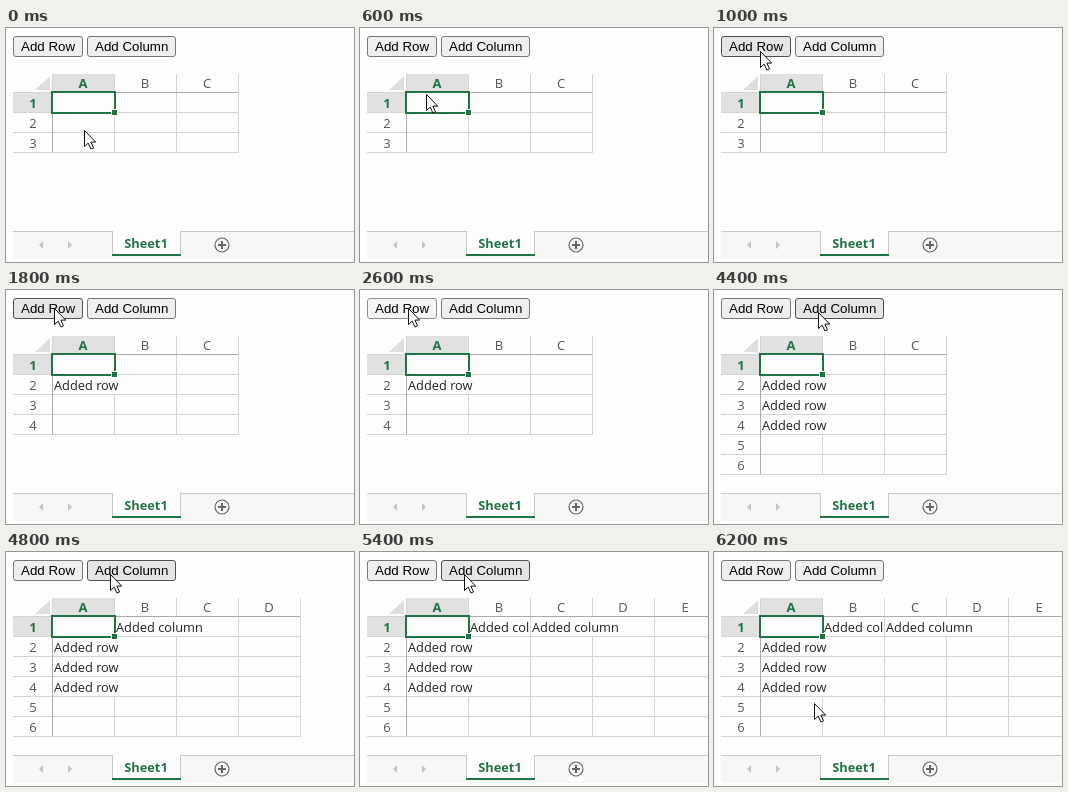
Write an HTML page with a canvas that moves like this. It is 348 by 234 pixels and loops after 6400 ms.

```html
<!DOCTYPE html>
<html lang="en">
<head>
<meta charset="utf-8">
<title>Spreadsheet: add rows and columns</title>
<style>
  html, body { margin: 0; width: 100%; height: 100%; overflow: hidden; background: #fefefe; }
  canvas { display: block; }
</style>
</head>
<body>
<canvas id="stage" width="348" height="234"></canvas>
<script>
const ctx = document.getElementById('stage').getContext('2d');
const LOOP = 6400, GREEN = '#217346', PAPER = '#fefefe', GRID = '#d4d4d4';
const LEFT = 46, TOP = 64, COL = 62, ROW = 20;
const CELL_FONT = '12.8px "Open Sans", "Noto Sans", sans-serif';
const HEAD_FONT = '13px "Open Sans", "Noto Sans", sans-serif';
const BUTTON_FONT = '13.333px "Liberation Sans", Arial, sans-serif';

// Pointer stops: time, x, y
const pointer = [
  [0, 78, 102], [400, 74, 88], [600, 66, 66], [800, 55, 42], [1000, 46, 23],
  [1200, 48, 18], [4000, 58, 19], [4200, 104, 22], [6200, 100, 151]
];
const rowTimes = [1800, 2800, 3600];
const colTimes = [4800, 5200];
const pressTimes = [1600, 2600, 3400, 4600];

const countPast = (times, t) => times.filter(s => t >= s).length;

function box(x, y, w, h, color) {
  ctx.fillStyle = color;
  ctx.fillRect(x, y, w, h);
}

function label(text, x, y, font, color, align = 'left') {
  ctx.font = font;
  ctx.fillStyle = color;
  ctx.textAlign = align;
  ctx.fillText(text, x, y);
}

function shape(points, fill, stroke) {
  ctx.beginPath();
  points.forEach(([x, y]) => ctx.lineTo(x, y));
  ctx.closePath();
  ctx.fillStyle = fill;
  ctx.fill();
  if (stroke) {
    ctx.strokeStyle = stroke;
    ctx.lineWidth = 1;
    ctx.stroke();
  }
}

function button(text, x, w, hover, pressed) {
  const [fill, edge] = pressed ? ['#f5f5f5', '#8d8d8d']
    : hover ? ['#e5e5e5', '#4f4f4f'] : ['#efefef', '#767676'];
  ctx.beginPath();
  ctx.roundRect(x + .5, 8.5, w - 1, 20, 2.5);
  ctx.fillStyle = fill;
  ctx.fill();
  ctx.strokeStyle = edge;
  ctx.lineWidth = 1;
  ctx.stroke();
  label(text, x + 8, 23, BUTTON_FONT, '#000');
}

function header(text, x, y, active) {
  label(text, x, y, (active ? 'bold ' : '') + HEAD_FONT, active ? GREEN : '#555', 'center');
}

// Cell text runs over empty neighbours and is cut at the given span.
function cell(text, col, row, span) {
  const x = LEFT + col * COL, y = TOP + row * ROW;
  ctx.save();
  ctx.beginPath();
  ctx.rect(x + 1, y + 1, span * COL - 1, ROW - 1);
  ctx.clip();
  if (span > 1) box(x + COL, y + 1, 1, ROW - 1, PAPER);
  label(text, x + 2, y + 16, CELL_FONT, '#222');
  ctx.restore();
}

function sheet(addedRows, addedCols) {
  const rows = 3 + addedRows, cols = 3 + addedCols;
  const width = cols * COL, height = rows * ROW;

  box(LEFT, 46, COL, 18, '#e1e1e1');
  box(7, TOP, 39, ROW, '#e1e1e1');
  shape([[44, 48], [44, 62], [29, 62]], '#dedede');

  for (let c = 0; c <= cols; c++) box(LEFT + c * COL, 46, 1, 19 + height, GRID);
  for (let r = 0; r <= rows; r++) box(7, TOP + r * ROW, 40 + width, 1, GRID);
  box(LEFT, TOP, 1, height, '#ababab');
  box(LEFT, TOP, width, 1, '#ababab');

  for (let c = 0; c < cols; c++) header('ABCDE'[c], LEFT + 31 + c * COL, 60, c === 0);
  for (let r = 0; r < rows; r++) header(r + 1, 27, 80 + r * ROW, r === 0);

  for (let r = 1; r <= addedRows; r++) cell('Added row', 0, r, 2);
  for (let c = 1; c <= addedCols; c++) cell('Added column', c, 0, c === addedCols ? 2 : 1);

  ctx.strokeStyle = GREEN;
  ctx.lineWidth = 2;
  ctx.strokeRect(LEFT, TOP, COL + 1, ROW + 1);
  box(105, 81, 7, 7, PAPER);
  box(106, 82, 5, 5, GREEN);
}

function tabs() {
  box(7, 203, 341, 28, '#f7f7f7');
  box(7, 203, 341, 1, '#c8c8c8');
  box(106, 203, 69, 25, '#c8c8c8');
  box(107, 203, 67, 24, PAPER);
  box(106, 226, 69, 2, GREEN);
  label('Sheet1', 140, 220, 'bold 12.8px "Open Sans", "Noto Sans", sans-serif', GREEN, 'center');
  shape([[37, 213], [37, 221], [33, 217]], '#c3c3c3');
  shape([[62, 213], [62, 221], [66, 217]], '#c3c3c3');
  ctx.beginPath();
  ctx.arc(216, 217, 7, 0, 2 * Math.PI);
  ctx.strokeStyle = '#666';
  ctx.lineWidth = 1.2;
  ctx.stroke();
  box(212, 216, 8, 2, '#666');
  box(215, 213, 2, 8, '#666');
}

function arrow(x, y) {
  const outline = [[0, 0], [0, 16], [3.7, 12.6], [6.4, 18.5], [9, 17.4], [6.4, 11.6], [11.2, 11.6]];
  shape(outline.map(([dx, dy]) => [x + dx + .5, y + dy + .5]), '#fff', '#111');
}

function draw(t) {
  const [, x, y] = pointer[countPast(pointer.map(p => p[0]), t) - 1];
  const overRow = t >= 1000 && t < 4200;
  const overCol = t >= 4200 && t < 6200;
  const pressed = pressTimes.some(s => t >= s && t < s + 200);

  box(0, 0, 348, 234, PAPER);
  button('Add Row', 7, 70, overRow, overRow && pressed);
  button('Add Column', 81, 89, overCol, overCol && pressed);
  sheet(countPast(rowTimes, t), countPast(colTimes, t));
  tabs();
  arrow(x, y);
}

const start = performance.now();
function tick() {
  draw((performance.now() - start) % LOOP);
  requestAnimationFrame(tick);
}
tick();
</script>
</body>
</html>
```
